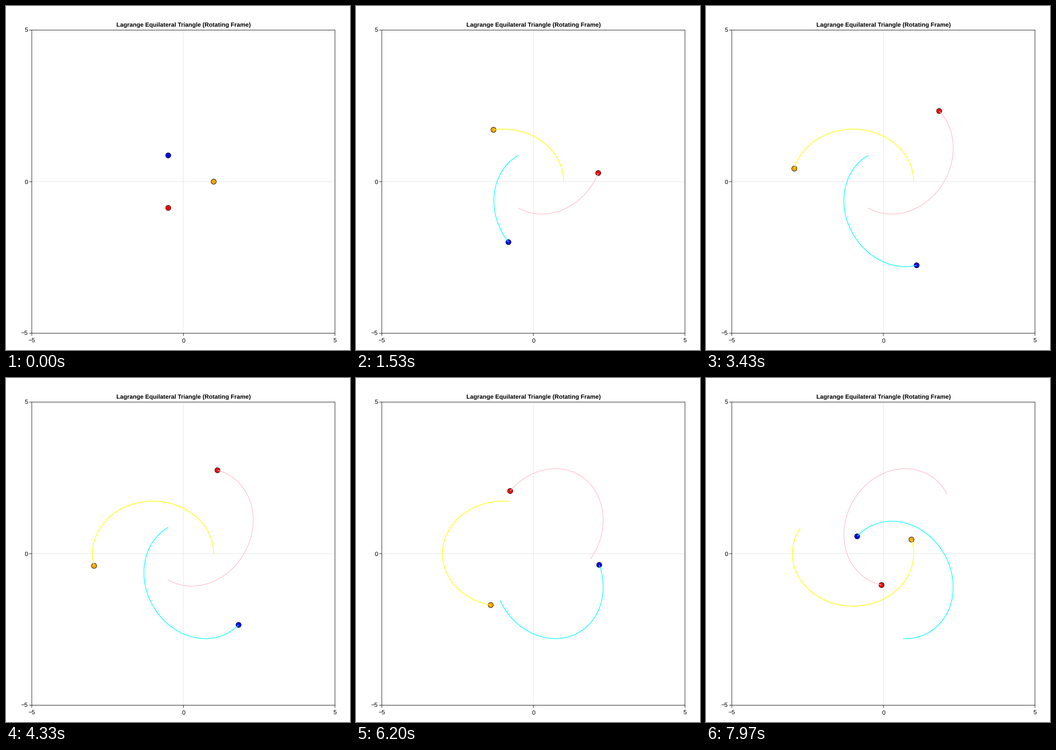
A matplotlib script for the animation above (8 s loop, 748x748 px).

```python
import numpy as np
import matplotlib.pyplot as plt
from matplotlib.animation import FuncAnimation
from matplotlib.collections import LineCollection
from matplotlib.patches import Circle

plt.rcParams["text.hinting"] = "no_hinting"
plt.rcParams["path.simplify"] = False

SIZE = 748
DPI = 100
UNIT = SIZE / 800            # layout unit in pixels
PT = 72 / DPI                # points per pixel

LOOP_MS = 8000
TICK_MS = 10                 # clock resolution
FPS = 30
POSES = LOOP_MS * FPS // 1000
TRAIL = 150                  # steps kept in each trail

# Three unit masses on an equilateral triangle, each on its own ellipse
SEMI_MAJOR, ECC = 2.0, 0.5
STEP = 0.1 * np.sqrt(1 / np.sqrt(3) / SEMI_MAJOR**3)   # mean anomaly per pose

LEFT, RIGHT = 60 * UNIT, 765 * UNIT
TOP, BOTTOM = 56 * UNIT, 761 * UNIT
MID_X, MID_Y = (LEFT + RIGHT) / 2, (TOP + BOTTOM) / 2
SCALE = (RIGHT - LEFT) / 10

BODIES = [("orange", "yellow", 0), ("blue", "cyan", 120), ("red", "pink", 240)]


def orbit(steps):
    """Complex positions on the base ellipse, from Kepler's equation."""
    mean = STEP * steps
    ecc_anom = mean + ECC * np.sin(mean)
    for _ in range(12):
        error = ecc_anom - ECC * np.sin(ecc_anom) - mean
        ecc_anom = ecc_anom - error / (1 - ECC * np.cos(ecc_anom))
    minor = SEMI_MAJOR * np.sqrt(1 - ECC**2)
    return SEMI_MAJOR * (np.cos(ecc_anom) - ECC) + 1j * minor * np.sin(ecc_anom)


def to_pixels(z):
    return MID_X + SCALE * z.real, MID_Y - SCALE * z.imag


fig = plt.figure(figsize=(SIZE / DPI, SIZE / DPI), dpi=DPI, facecolor="white")
ax = fig.add_axes([0, 0, 1, 1])
ax.set_xlim(0, SIZE)
ax.set_ylim(SIZE, 0)
ax.axis("off")


def rules(segments, color, zorder):
    lines = LineCollection(segments, colors=[color], linewidths=UNIT * PT,
                           capstyle="butt", joinstyle="miter", zorder=zorder)
    lines.set_snap(False)
    ax.add_collection(lines, autolim=False)


def label(x, y, text, ha, weight="normal"):
    ax.text(x, y, text, ha=ha, va="baseline", family="Liberation Sans",
            fontsize=14 * UNIT * PT, weight=weight, color="black", zorder=6)


rules([[(MID_X, TOP), (MID_X, BOTTOM)], [(LEFT, MID_Y), (RIGHT, MID_Y)]],
      (0, 0, 0, 0.12), 1)

half, tick = UNIT / 2, 6 * UNIT
dark = [[(LEFT - half, y), (RIGHT + half, y)] for y in (TOP, BOTTOM)]
dark += [[(x, TOP), (x, BOTTOM)] for x in (LEFT, RIGHT)]
for value in (-5, 0, 5):
    text = str(value).replace("-", "\u2212")
    x, y = MID_X + SCALE * value, MID_Y - SCALE * value
    dark += [[(x, BOTTOM), (x, BOTTOM + tick)], [(LEFT - tick, y), (LEFT, y)]]
    label(x, BOTTOM + 20.4, text, "center")
    label(LEFT - tick - 2.8, y + 4.7, text, "right")
rules(dark, "black", 5)

label(MID_X, TOP - 7.4, "Lagrange Equilateral Triangle (Rotating Frame)",
      "center", "bold")

path = orbit(np.arange(POSES))
actors = []
for fill, trail_color, angle in BODIES:
    points = np.column_stack(to_pixels(path * np.exp(1j * np.radians(angle))))
    dot = ax.add_patch(Circle(points[0], 6 * UNIT, facecolor=fill,
                              edgecolor="black", lw=UNIT * PT, zorder=3))
    trail, = ax.plot([], [], color=trail_color, lw=1.5 * UNIT * PT,
                     solid_capstyle="butt", zorder=4, snap=False)
    actors.append((points, dot, trail))


def update(frame):
    # Poses run at 30 per second, each starting on the nearest clock tick
    pose = (frame * TICK_MS + TICK_MS // 2) * FPS // 1000
    start = max(0, pose - TRAIL)
    for points, dot, trail in actors:
        dot.center = points[pose]
        trail.set_data(*points[start:pose + 1].T)
    return [artist for _, dot, trail in actors for artist in (dot, trail)]


anim = FuncAnimation(fig, update, frames=LOOP_MS // TICK_MS, interval=TICK_MS,
                     init_func=lambda: update(0), repeat=True, repeat_delay=0)
plt.show()
```
